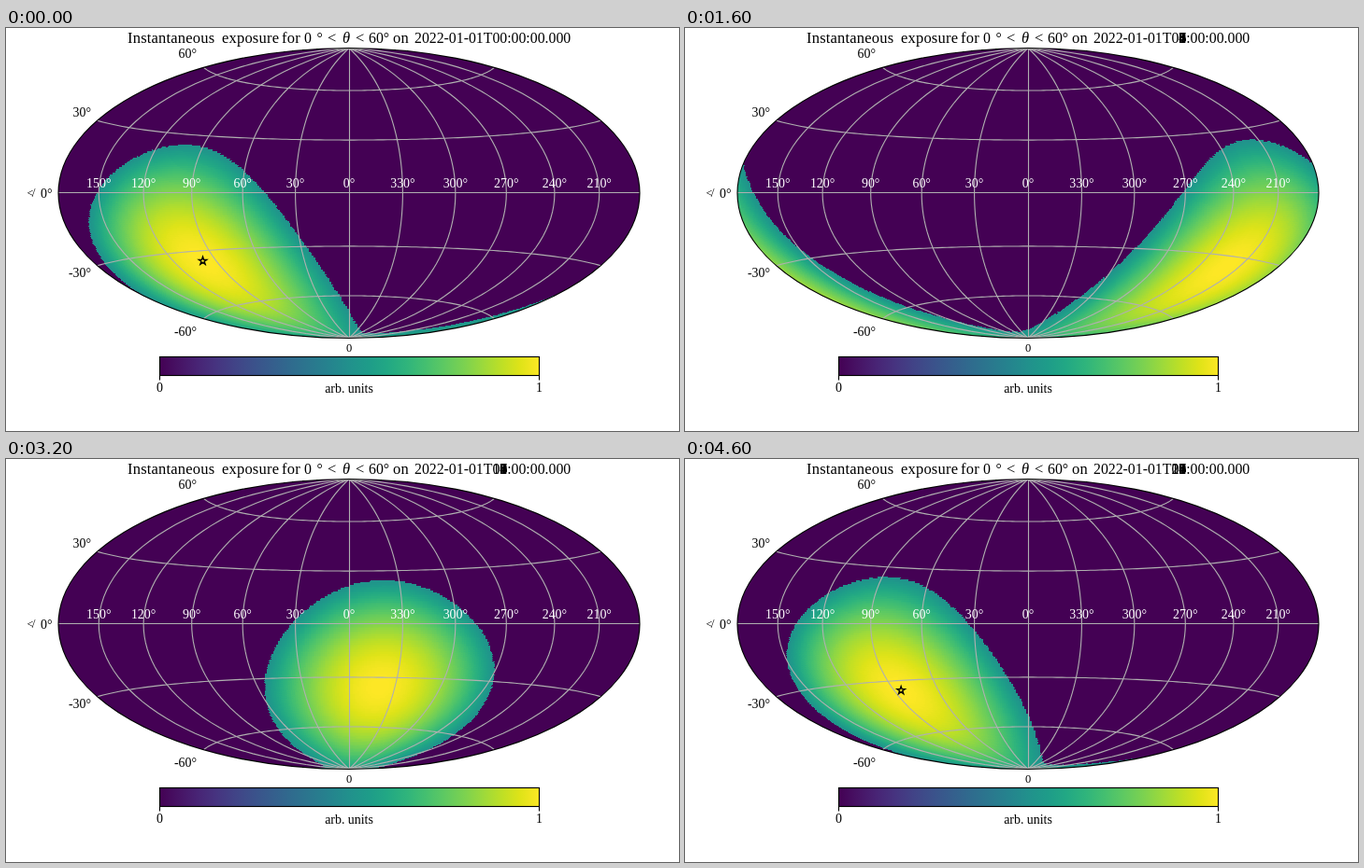
These frames come from a looping animation (720x432 px, 4800 ms). An HTML page with a canvas:

```html
<!DOCTYPE html>
<html lang="en">
<head>
<meta charset="utf-8">
<title>Instantaneous exposure</title>
<style>
  html, body { margin: 0; width: 720px; height: 432px; overflow: hidden; background: #fff; }
  canvas, svg { position: absolute; left: 0; top: 0; display: block; }
  text { font-family: "Liberation Serif", "Times New Roman", serif; font-size: 13.9px; white-space: pre; }
  .words { font-size: 16.5px; letter-spacing: .2px; }
  .stamp { font-size: 15.8px; }
  .grid { fill: none; stroke: #b0b0b0; stroke-width: 1.11; }
  .frame { fill: none; stroke: #000; stroke-width: 1.11; }
</style>
</head>
<body>
<canvas id="map" width="720" height="432"></canvas>
<svg id="art" width="720" height="432" viewBox="0 0 720 432"></svg>
<script>
const W = 720, H = 432, CX = 367, CY = 177, RX = 311, RY = 155.5;
const STEP = 200, HOURS = 24;
const RAD = Math.PI / 180;
const DEC = -35.3 * RAD, START_LON = 99.3, HOUR_DEG = 15.041;
const VIRIDIS = ["440154", "471365", "482475", "463480", "414487", "3b528b", "355f8d",
  "2f6c8e", "2a788e", "25848e", "21918c", "1e9c89", "22a884", "2fb47c", "44bf70",
  "5ec962", "7ad151", "9bd93c", "bddf26", "dfe318", "fde725"];
const LAST = VIRIDIS.length - 1;

const svg = document.getElementById("art");
const ctx = document.getElementById("map").getContext("2d");

function add(tag, attrs, parent = svg) {
  const el = document.createElementNS("http://www.w3.org/2000/svg", tag);
  for (const k in attrs) el.setAttribute(k, attrs[k]);
  parent.appendChild(el);
  return el;
}

function label(str, x, y, attrs = {}) {
  const el = add("text", { x, y, ...attrs });
  el.textContent = str;
  return el;
}

// Hammer projection, longitude growing to the left
function project(lon, lat) {
  const half = lon * RAD / 2, phi = lat * RAD;
  const d = Math.sqrt(1 + Math.cos(phi) * Math.cos(half));
  return [CX - RX * Math.cos(phi) * Math.sin(half) / d, CY - RY * Math.sin(phi) / d];
}

function curve(at, from, to) {
  const pts = [];
  for (let v = from; v <= to; v += 3) pts.push(at(v).map(n => n.toFixed(2)).join(" "));
  add("path", { d: "M" + pts.join("L"), class: "grid" });
}

function drawGrid() {
  for (let lon = -150; lon <= 150; lon += 30) {
    if (lon) curve(lat => project(lon, lat), -90, 90);
  }
  for (let lat = -60; lat <= 60; lat += 30) {
    if (lat) curve(lon => project(lon, lat), -180, 180);
  }
  // the straight lines sit on whole pixels
  add("path", { d: `M${CX + 0.5} ${CY - RY}v${2 * RY}M${CX - RX} ${CY - 0.5}h${2 * RX}`, class: "grid" });
  add("ellipse", { cx: CX, cy: CY, rx: RX, ry: RY, class: "frame" });
  for (let lon = -150; lon <= 150; lon += 30) {
    label((lon + 360) % 360 + "°", project(lon, 0)[0], 170.5, { fill: "#fff", "text-anchor": "middle" });
  }
  [[60, 204, 31.5], [30, 91, 94.5], [0, 49.5, 181.5], [-30, 91, 266.5], [-60, 204, 329.5]].forEach(
    ([lat, x, y]) => label(lat + "°", x, y, { "text-anchor": "end" }));
  label("≮", 26, 181, { "text-anchor": "middle", style: "font-size:12px" });
  label("0", CX, 347, { "text-anchor": "middle", style: "font-size:12.5px" });
}

function drawBar() {
  const grad = add("linearGradient", { id: "ramp" });
  VIRIDIS.forEach((c, i) => add("stop", { offset: i / LAST, "stop-color": "#" + c }, grad));
  add("rect", { x: 164.5, y: 352.5, width: 406, height: 20, class: "frame", style: "fill:url(#ramp)" });
  add("path", { d: "M164.5 372.5v5M570.5 372.5v5", class: "frame" });
  const mid = { "text-anchor": "middle" };
  label("0", 164.5, 390, mid);
  label("1", 570.5, 390, mid);
  label("arb. units", CX, 390.5, mid);
}

function drawTitle() {
  const words = { class: "words" }, stamp = { class: "stamp" };
  const y = 16;
  label("Instantaneous", 130, y, words);
  label("exposure", 231, y, words);
  label("for", 295, y, words);
  label("0", 319, y, stamp);
  label("°", 332.5, y, stamp);
  label("<", 344, y, words);
  label("θ", 360, y, { class: "words", "font-style": "italic" });
  label("<", 374, y, words);
  label("60°", 388, y, stamp);
  label("on", 414, y, words);
  label("2022-01-01T", 437, y, stamp);
  label(":00:00.000", 536.2, y, stamp);
  // hour digits print over each other as the day goes on
  const digits = [];
  for (let d = 0; d < 3; d++) digits.push({ since: d * 10, el: label(d, 520.4, y, stamp) });
  for (let d = 0; d < 10; d++) digits.push({ since: d, el: label(d, 528.3, y, stamp) });
  return digits;
}

function drawStar() {
  const pts = [];
  for (let i = 0; i < 10; i++) {
    const r = i % 2 ? 1.7 : 4.4, a = i * Math.PI / 5;
    pts.push((r * Math.sin(a)).toFixed(2) + "," + (-r * Math.cos(a)).toFixed(2));
  }
  return add("polygon", { points: pts.join(" "), fill: "none", stroke: "#000", "stroke-width": 1.4 });
}

function buildRamp() {
  const stops = VIRIDIS.map(c => [0, 2, 4].map(i => parseInt(c.slice(i, i + 2), 16)));
  return Array.from({ length: 256 }, (_, i) => {
    const v = i / 255 * LAST, k = Math.min(LAST - 1, Math.floor(v));
    return stops[k].map((c, j) => Math.round(c + (stops[k + 1][j] - c) * (v - k)));
  });
}

// Sky direction of each pixel in the ellipse, snapped to roughly equal cells
function buildSky() {
  const sky = [], cell = 0.9 * RAD;
  for (let py = 21; py < 334; py++) {
    for (let px = 55; px < 680; px++) {
      const x = (CX - px - 0.5) / RX, y = (CY - py - 0.5) / RY;
      if (x * x + y * y > 1) continue;
      const z = Math.sqrt(1 - (x * x + y * y) / 2);
      let lat = Math.asin(Math.max(-1, Math.min(1, z * Math.SQRT2 * y)));
      let lon = 2 * Math.atan2(z * Math.SQRT2 * x, 2 * z * z - 1);
      lat = Math.round(lat / cell) * cell;
      const w = 2 * Math.PI / Math.max(4, Math.round(2 * Math.PI * Math.cos(lat) / cell));
      lon = (Math.floor(lon / w) + 0.5) * w;
      sky.push({ at: (py * W + px) * 4, lon, sin: Math.sin(lat) * Math.sin(DEC), cos: Math.cos(lat) * Math.cos(DEC) });
    }
  }
  return sky;
}

drawGrid();
drawBar();
const digits = drawTitle(), star = drawStar();
const ramp = buildRamp(), sky = buildSky();
const image = ctx.createImageData(W, H);

function drawHour(hour) {
  const deg = (START_LON + hour * HOUR_DEG) % 360;
  const lon = deg * RAD;
  for (const p of sky) {
    const v = p.sin + p.cos * Math.cos(p.lon - lon);
    const c = ramp[v >= 0.5 ? Math.min(255, Math.floor(v * 256)) : 0];
    image.data[p.at] = c[0];
    image.data[p.at + 1] = c[1];
    image.data[p.at + 2] = c[2];
    image.data[p.at + 3] = 255;
  }
  ctx.putImageData(image, 0, 0);
  const [x, y] = project(deg, DEC / RAD);
  star.setAttribute("transform", `translate(${x} ${y})`);
  star.style.display = deg < 180 ? "" : "none";
  for (const d of digits) d.el.style.display = hour >= d.since ? "" : "none";
}

let shown = -1;
function tick() {
  const hour = Math.floor(performance.now() / STEP) % HOURS;
  if (hour !== shown) drawHour(shown = hour);
  requestAnimationFrame(tick);
}
tick();
</script>
</body>
</html>
```
